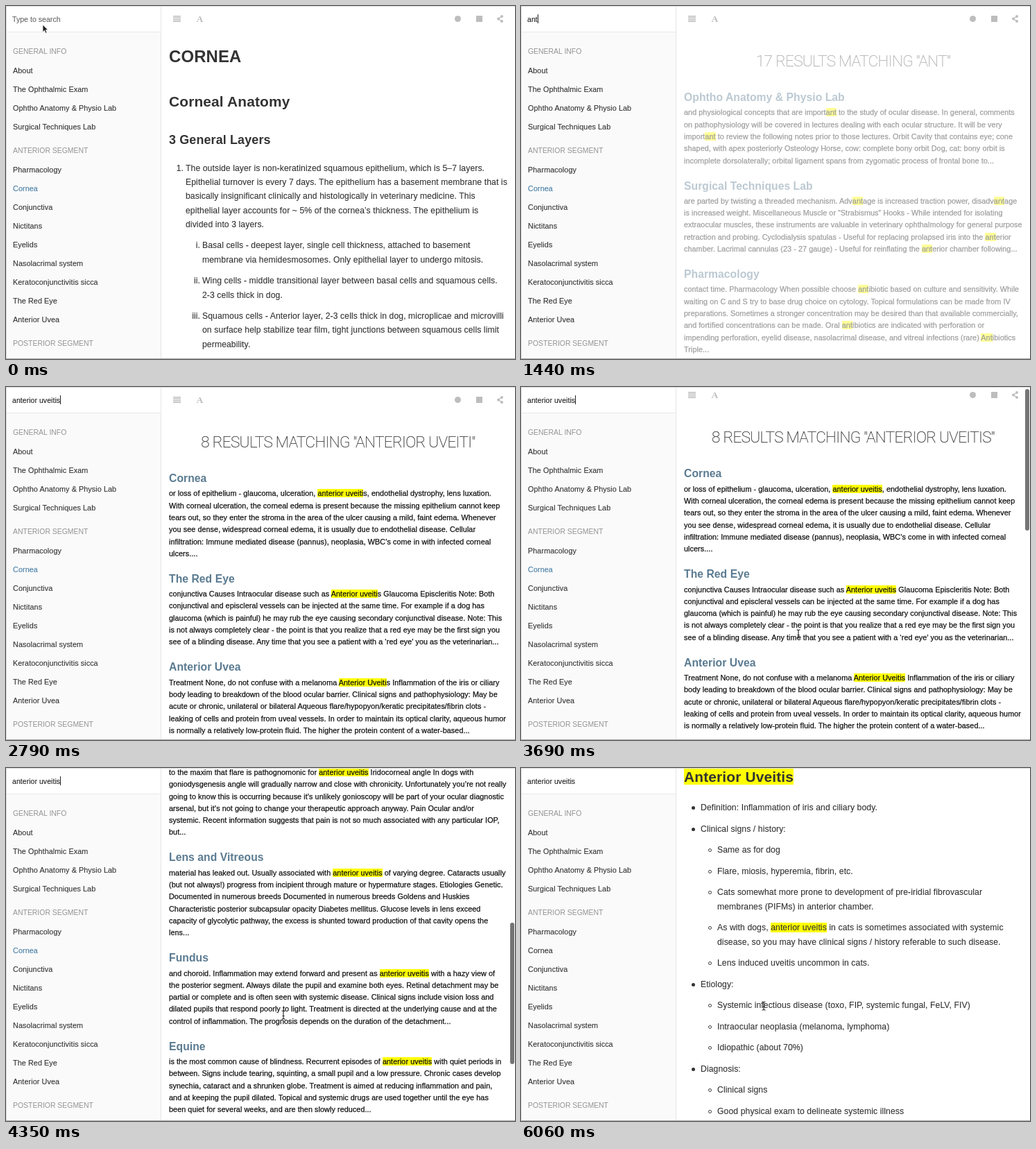
Write an HTML page that moves like this. It is 734x509 px and loops after 6120 ms.

```html
<!DOCTYPE html>
<html lang="en">
<head>
<meta charset="utf-8">
<title>Documentation search</title>
<style>
html, body { margin: 0; width: 100%; height: 100%; overflow: hidden; background: #fff; }
#stage { position: relative; width: 734px; height: 509px; overflow: hidden; background: #fff; color: #333;
  font-family: "Liberation Sans", Arial, sans-serif; }
#stage div, #stage svg { position: absolute; }
.line { white-space: pre; line-height: 30px; height: 30px; }
.nav { font-size: 10.8px; letter-spacing: .08px; -webkit-text-stroke: .12px; }
.group { font-size: 10.44px; color: #939393; }
.field { font-size: 10.5px; letter-spacing: .05px; color: #222; -webkit-text-stroke: .12px; }
.hint { color: #666; }
.active { color: #457ca3; }
.h1, .h2, .h3 { font-weight: bold; letter-spacing: .15px; }
.h1 { font-size: 23.9px; }
.h2 { font-size: 20.9px; }
.h3 { font-size: 17.9px; }
.body { font-size: 12.2px; letter-spacing: .09px; -webkit-text-stroke: .1px; }
.count { width: 510px; text-align: center; font: 100 22.4px/30px Roboto, Lato, sans-serif; letter-spacing: -.6px;
  color: #333; -webkit-text-stroke: .25px; }
.title { font-size: 15.7px; font-weight: bold; letter-spacing: .05px; color: #5b7b91; }
.text { font-size: 10.8px; letter-spacing: .07px; color: #111; -webkit-text-stroke: .25px; }
mark { background: #ff0; color: inherit; }
#side { left: 0; top: 0; width: 223px; height: 509px; background: #fafafa; border-right: 1px solid #e6e6e6; }
#search { left: 0; top: 0; width: 223px; height: 37px; background: #fff; border-bottom: 1px solid #e8e8e8; }
#main { left: 224px; top: 0; width: 510px; height: 509px; overflow: hidden; }
#page { left: -224px; top: 0; width: 734px; height: 1300px; }
#caret { width: 1px; height: 13px; top: 12px; background: #222; }
#thumb { left: 727px; width: 6px; border-radius: 3px; background: #747474; }
#status { left: -1px; top: 496px; width: 244px; height: 14px; background: #e9e9e9; border: 1px solid #bdbdbd;
  border-radius: 0 3px 0 0; box-sizing: border-box; }
#status .line { font-size: 8.9px; color: #222; -webkit-text-stroke: .2px #222; }
#edge { left: 0; top: 0; width: 733px; height: 507px; border: solid #dcdcdc; border-width: 1px 0 1px 1px; border-bottom-color: #a9a9a9; }
</style>
</head>
<body>
<div id="stage">
  <div id="main"><div id="page"></div></div>
  <div id="side"></div>
  <div id="search"><div id="field"></div><div id="caret"></div></div>
  <div id="thumb"></div>
  <div id="status"></div>
  <div id="edge"></div>
  <svg id="cursor" width="24" height="24" viewBox="-8 -8 24 24" style="overflow:visible"></svg>
</div>
<script>
const LOOP = 6120, QUERY = "anterior uveitis";
const KEY_START = 1145, KEY_STEP = 106, LAG = 79, OPEN = 4800;
const $ = id => document.getElementById(id);
const clamp = v => Math.max(0, Math.min(1, v));

const articles = {
  anatomyAnt: ["Ophtho Anatomy & Physio Lab",
    "and physiological concepts that are important to the study of ocular disease. In general, comments",
    "on pathophysiology will be covered in lectures dealing with each ocular structure. It will be very",
    "important to review the following notes prior to those lectures. Orbit Cavity that contains eye; cone",
    "shaped, with apex posteriorly Osteology Horse, cow: complete bony orbit Dog, cat: bony orbit is",
    "incomplete dorsolaterally; orbital ligament spans from zygomatic process of frontal bone to..."],
  surgical: ["Surgical Techniques Lab",
    "are parted by twisting a threaded mechanism. Advantage is increased traction power, disadvantage",
    "is increased weight. Miscellaneous Muscle or “Strabismus” Hooks - While intended for isolating",
    "extraocular muscles, these instruments are valuable in veterinary ophthalmology for general purpose",
    "retraction and probing. Cyclodialysis spatulas - Useful for replacing prolapsed iris into the anterior",
    "chamber. Lacrimal cannulas (23 - 27 gauge) - Useful for reinflating the anterior chamber following..."],
  pharma: ["Pharmacology",
    "contact time. Pharmacology When possible choose antibiotic based on culture and sensitivity. While",
    "waiting on C and S try to base drug choice on cytology. Topical formulations can be made from IV",
    "preparations. Sometimes a stronger concentration may be desired than that available commercially,",
    "and fortified concentrations can be made. Oral antibiotics are indicated with perforation or",
    "impending perforation, eyelid disease, nasolacrimal disease, and vitreal infections (rare) Antibiotics",
    "Triple..."],
  anatomy: ["Ophtho Anatomy & Physio Lab",
    "axon bundles exit eye. Uveal Tract Overview Anterior uvea: iris and ciliary body Posterior uvea:",
    "choroid Very vascular, darkly pigmented Iris Gross anatomy Ciliary zone - peripheral half of iris",
    "Pupillary zone - central half Collarette - line of demarcation between pupillary and ciliary zones Iris",
    "rests against anterior surface of lens Histologic anatomy - divided into 4 layers: Anterior border layer",
    "Stroma: Loose collagenous fibers. Contains pupillary sphincter muscle. Dilator muscle..."],
  cornea: ["Cornea",
    "or loss of epithelium - glaucoma, ulceration, anterior uveitis, endothelial dystrophy, lens luxation.",
    "With corneal ulceration, the corneal edema is present because the missing epithelium cannot keep",
    "tears out, so they enter the stroma in the area of the ulcer causing a mild, faint edema. Whenever",
    "you see dense, widespread corneal edema, it is usually due to endothelial disease. Cellular",
    "infiltration: Immune mediated disease (pannus), neoplasia, WBC’s come in with infected corneal",
    "ulcers...."],
  redEye: ["The Red Eye",
    "conjunctiva Causes Intraocular disease such as Anterior uveitis Glaucoma Episcleritis Note: Both",
    "conjunctival and episcleral vessels can be injected at the same time. For example if a dog has",
    "glaucoma (which is painful) he may rub the eye causing secondary conjunctival disease. Note: This",
    "is not always completely clear - the point is that you realize that a red eye may be the first sign you",
    "see of a blinding disease. Any time that you see a patient with a ‘red eye’ you as the veterinarian..."],
  uvea: ["Anterior Uvea",
    "Treatment None, do not confuse with a melanoma Anterior Uveitis Inflammation of the iris or ciliary",
    "body leading to breakdown of the blood ocular barrier. Clinical signs and pathophysiology: May be",
    "acute or chronic, unilateral or bilateral Aqueous flare/hypopyon/keratic precipitates/fibrin clots -",
    "leaking of cells and protein from uveal vessels. In order to maintain its optical clarity, aqueous humor",
    "is normally a relatively low-protein fluid. The higher the protein content of a water-based..."],
  glaucoma: ["Glaucoma",
    "to the maxim that flare is pathognomonic for anterior uveitis Iridocorneal angle In dogs with",
    "goniodysgenesis angle will gradually narrow and close with chronicity. Unfortunately you’re not really",
    "going to know this is occurring because it’s unlikely gonioscopy will be part of your ocular diagnostic",
    "arsenal, but it’s not going to change your therapeutic approach anyway. Pain Ocular and/or",
    "systemic. Recent information suggests that pain is not so much associated with any particular IOP,",
    "but..."],
  lens: ["Lens and Vitreous",
    "material has leaked out. Usually associated with anterior uveitis of varying degree. Cataracts usually",
    "(but not always!) progress from incipient through mature or hypermature stages. Etiologies Genetic.",
    "Documented in numerous breeds Documented in numerous breeds Goldens and Huskies",
    "Characteristic posterior subcapsular opacity Diabetes mellitus. Glucose levels in lens exceed",
    "capacity of glycolytic pathway, the excess is shunted toward production of that cavity opens the",
    "lens..."],
  fundus: ["Fundus",
    "and choroid. Inflammation may extend forward and present as anterior uveitis with a hazy view of",
    "the posterior segment. Always dilate the pupil and examine both eyes. Retinal detachment may be",
    "partial or complete and is often seen with systemic disease. Clinical signs include vision loss and",
    "dilated pupils that respond poorly to light. Treatment is directed at the underlying cause and at the",
    "control of inflammation. The prognosis depends on the duration of the detachment..."],
  equine: ["Equine",
    "is the most common cause of blindness. Recurrent episodes of anterior uveitis with quiet periods in",
    "between. Signs include tearing, squinting, a small pupil and a low pressure. Chronic cases develop",
    "synechia, cataract and a shrunken globe. Treatment is aimed at reducing inflammation and pain,",
    "and at keeping the pupil dilated. Topical and systemic drugs are used together until the eye has",
    "been quiet for several weeks, and are then slowly reduced..."],
  feline: ["Feline Ophthalmology",
    "and in older cats the iris may darken slowly. Anterior Uveitis Definition: Inflammation of iris and",
    "ciliary body. Clinical signs / history: Same as for dog Flare, miosis, hyperemia, fibrin, etc. Cats",
    "somewhat more prone to development of pre-iridial fibrovascular membranes (PIFMs) in anterior",
    "chamber. Lens induced uveitis uncommon in cats. Etiology: Systemic infectious disease,",
    "intraocular neoplasia, idiopathic (about 70%)..."]
};
const lists = {
  17: ["anatomyAnt", "surgical", "pharma"],
  9: ["anatomy", "cornea", "redEye", "uvea"],
  8: ["cornea", "redEye", "uvea", "glaucoma", "lens", "fundus", "equine", "feline"]
};

// y is the vertical middle of the line
function line(x, y, cls, text, q) {
  let html = text.replace(/&/g, "&amp;");
  if (q) html = html.replace(new RegExp(q, "gi"), "<mark>$&</mark>");
  return `<div class="line ${cls}" style="left:${x}px;top:${y - 15}px">${html}</div>`;
}

function marker(x, y, kind) {
  if (kind === "disc" || kind === "ring") {
    const look = kind === "disc" ? "background:#333" : "border:1px solid #333;box-sizing:border-box";
    return `<div style="left:${x - 13.5}px;top:${y - 2}px;width:5px;height:5px;border-radius:50%;${look}"></div>`;
  }
  return `<div class="line body" style="right:${734 - x + 3}px;top:${y - 15}px">${kind}</div>`;
}

function paragraphs(y, items, q) {
  let out = "";
  for (const [x, kind, ...rows] of items) {
    out += marker(x, y, kind);
    for (const row of rows) { out += line(x, y, "body", row, q); y += 20.35; }
    y += 10.15;
  }
  return out;
}

const toolbar = `<svg width="734" height="37" style="left:0;top:0" fill="#bdbdbd">
  <path d="M241 14.7h11M241 17.2h11M241 19.7h11M241 22.2h11" stroke="#bdbdbd" stroke-width="1.4"/>
  <text x="274.5" y="23" font-family="Liberation Serif, serif" font-weight="bold" font-size="13.5">A</text>
  <circle cx="651.5" cy="18.5" r="4.5"/><rect x="678" y="14" width="9" height="9"/>
  <path d="M715 15l-5 3.5l5 3.5" fill="none" stroke="#bdbdbd" stroke-width="1.5"/>
  <circle cx="715" cy="15" r="2"/><circle cx="710" cy="18.5" r="2"/><circle cx="715" cy="22" r="2"/></svg>`;

const corneaPage = () => toolbar +
  line(235, 73, "h1", "CORNEA") + line(235, 138, "h2", "Corneal Anatomy") + line(235, 193, "h3", "3 General Layers") +
  paragraphs(233.5, [
    [259, "1.", "The outside layer is non-keratinized squamous epithelium, which is 5–7 layers.",
      "Epithelial turnover is every 7 days. The epithelium has a basement membrane that is",
      "basically insignificant clinically and histologically in veterinary medicine. This",
      "epithelial layer accounts for ~ 5% of the cornea’s thickness. The epithelium is",
      "divided into 3 layers."],
    [283, "i.", "Basal cells - deepest layer, single cell thickness, attached to basement",
      "membrane via hemidesmosomes. Only epithelial layer to undergo mitosis."],
    [283, "ii.", "Wing cells - middle transitional layer between basal cells and squamous cells.",
      "2-3 cells thick in dog."],
    [283, "iii.", "Squamous cells - Anterior layer, 2-3 cells thick in dog, microplicae and microvilli",
      "on surface help stabilize tear film, tight junctions between squamous cells limit",
      "permeability."]
  ]);

const felinePage = () => line(235, 13, "h2", "Anterior Uveitis", QUERY) +
  paragraphs(57.3, [
    [259, "disc", "Definition: Inflammation of iris and ciliary body."],
    [259, "disc", "Clinical signs / history:"],
    [283, "ring", "Same as for dog"],
    [283, "ring", "Flare, miosis, hyperemia, fibrin, etc."],
    [283, "ring", "Cats somewhat more prone to development of pre-iridial fibrovascular",
      "membranes (PIFMs) in anterior chamber."],
    [283, "ring", "As with dogs, anterior uveitis in cats is sometimes associated with systemic",
      "disease, so you may have clinical signs / history referable to such disease."],
    [283, "ring", "Lens induced uveitis uncommon in cats."],
    [259, "disc", "Etiology:"],
    [283, "ring", "Systemic infectious disease (toxo, FIP, systemic fungal, FeLV, FIV)"],
    [283, "ring", "Intraocular neoplasia (melanoma, lymphoma)"],
    [283, "ring", "Idiopathic (about 70%)"],
    [259, "disc", "Diagnosis:"],
    [283, "ring", "Clinical signs"],
    [283, "ring", "Good physical exam to delineate systemic illness"]
  ], QUERY);

function resultsPage(q) {
  const count = q.length < 4 ? 17 : q.length < 13 ? 9 : 8;
  let y = 132;
  let out = line(224, 79, "count", `${count} RESULTS MATCHING "${q.toUpperCase()}"`);
  for (const id of lists[count]) {
    const [title, ...rows] = articles[id];
    out += line(235, y, "title", title);
    rows.forEach((row, i) => out += line(235, y + 21.3 + 17.3 * i, "text", row, q));
    y += 41 + 17.3 * rows.length;
  }
  return toolbar + `<div id="results" style="left:0;top:0;width:734px;height:1300px">${out}</div>`;
}

function sidebar(active) {
  const groups = [
    [66, "GENERAL INFO", "About", "The Ophthalmic Exam", "Ophtho Anatomy & Physio Lab", "Surgical Techniques Lab"],
    [209, "ANTERIOR SEGMENT", "Pharmacology", "Cornea", "Conjunctiva", "Nictitans", "Eyelids", "Nasolacrimal system",
      "Keratoconjunctivitis sicca", "The Red Eye", "Anterior Uvea"],
    [487, "POSTERIOR SEGMENT"]
  ];
  return groups.map(([y, name, ...items]) => line(10, y, "group", name) + items.map((s, i) =>
    line(10, y + 27.2 + 27 * i, s === active ? "nav active" : "nav", s)).join("")).join("");
}

const cursors = {
  none: "",
  arrow: '<path d="M0 0V10.6L2.5 8.3L4.2 12.2L6 11.4L4.4 7.6H7.6Z" fill="#222" stroke="#fff" stroke-width=".7"/>',
  beam: '<path d="M-2.5 -6Q0 -6 0 -4.5Q0 -6 2.5 -6M0 -4.5V4.5M-1.5 1.5H1.5M-2.5 6Q0 6 0 4.5Q0 6 2.5 6" fill="none" stroke="#222" stroke-width="1.1"/>',
  hand: '<path d="M-1 0Q0 -1 1 0V4L5.5 5Q7 5.5 6.5 8L5.5 12H-.5L-3.5 7.5Q-3.5 6 -1 7Z" fill="#fff" stroke="#222" stroke-width=".9"/>'
};

// straight runs between [time, value] points
function track(t, pts) {
  if (t <= pts[0][0]) return pts[0][1];
  for (let i = 1; i < pts.length; i++) {
    const [a, va] = pts[i - 1], [b, vb] = pts[i];
    if (t < b) return va + (vb - va) * (t - a) / (b - a);
  }
  return pts[pts.length - 1][1];
}

const shown = {};
function put(id, key, make) {
  if (shown[id] === key) return;
  shown[id] = key;
  $(id).innerHTML = make();
}

const typed = t => QUERY.slice(0, Math.max(0, Math.floor((t - KEY_START) / KEY_STEP) + 1));

function cursorAt(t) {
  if (t < 300) return ["arrow", 52.5, 27];
  if (t < KEY_START) return ["beam", track(t, [[300, 52], [480, 46]]), track(t, [[300, 26], [480, 18]])];
  if (t < 3450) return ["none", 0, 0];
  const x = track(t, [[4540, 400], [4660, 350]]), y = track(t, [[4540, 356], [4660, 343]]);
  return [t < 4640 ? "beam" : t < OPEN ? "hand" : t < 5300 ? "arrow" : "beam", x, y];
}

function draw(t) {
  const opened = t >= OPEN, text = typed(t), q = typed(t - LAG);
  put("side", opened ? "" : "Cornea", () => sidebar(opened ? "" : "Cornea"));
  put("field", text, () => text ? line(9, 18.5, "field", text) : line(9, 18.5, "field hint", "Type to search"));
  if (opened) put("page", "feline", felinePage);
  else if (q) put("page", "?" + q, () => resultsPage(q));
  else put("page", "cornea", corneaPage);

  const results = $("results");
  if (results) results.style.opacity = clamp((t - 1240) / 500);

  const scroll = opened ? 0 : track(t, [[3660, 0], [3690, 6], [4140, 256], [4440, 670], [4560, 745]]);
  $("page").style.top = -scroll + "px";
  const thumb = $("thumb").style;
  thumb.top = (opened ? 262 : .6 + .406 * scroll) + "px";
  thumb.height = (opened ? 45 : 204) + "px";
  thumb.opacity = track(t, [[3600, 0], [3680, 1], [5350, 1], [5550, 0]]);

  const caret = $("caret").style;
  caret.display = t > 540 && !opened ? "block" : "none";
  caret.left = (text ? 9 + $("field").firstChild.offsetWidth : 9) + "px";
  $("status").style.opacity = track(t, [[4640, 0], [4700, 1], [5200, 1], [5400, 0]]);

  const [kind, x, y] = cursorAt(t);
  put("cursor", kind, () => cursors[kind]);
  $("cursor").style.left = x - 8 + "px";
  $("cursor").style.top = y - 8 + "px";
}

$("status").innerHTML = line(2, 6, "", "localhost:4000/FELINE/Feline.html?h=anterior uveitis");
const start = performance.now();
function tick() {
  draw((performance.now() - start) % LOOP);
  requestAnimationFrame(tick);
}
draw(0);
requestAnimationFrame(tick);
</script>
</body>
</html>
```
